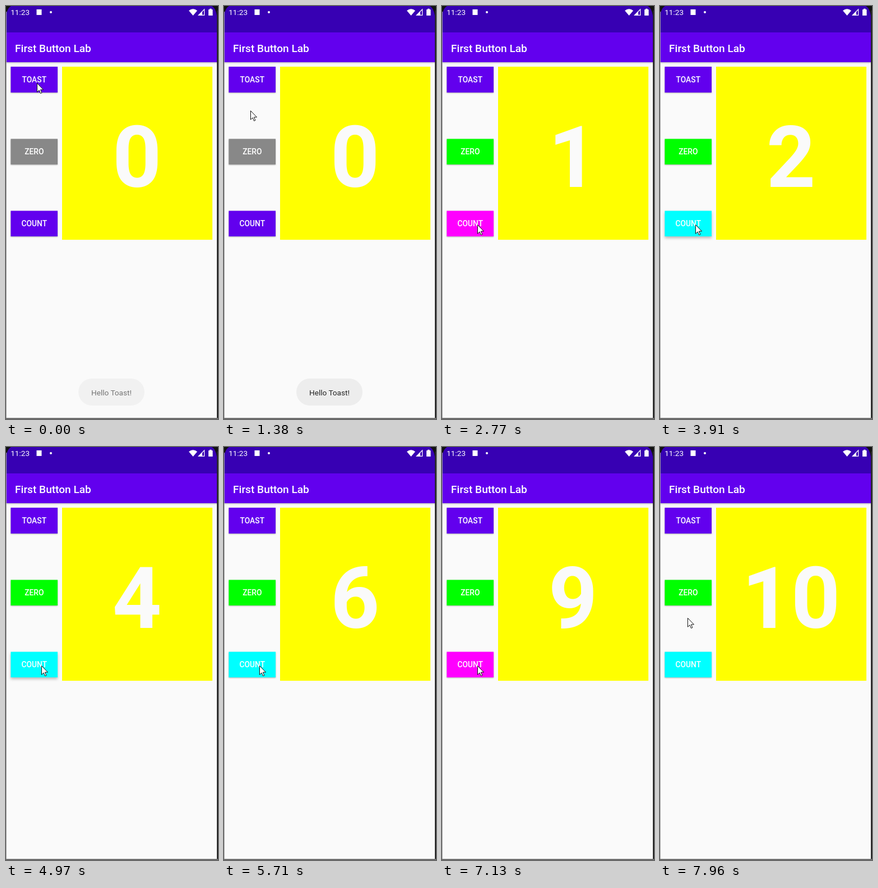
Write an HTML page that moves like this. It is 378 px wide and 735 px high and loops after 8000 ms.

```html
<!DOCTYPE html>
<html lang="en">
<head>
<meta charset="utf-8">
<title>Button counter</title>
<style>
html, body { margin: 0; width: 100%; height: 100%; overflow: hidden; background: #fafafa; }
svg { display: block; width: 378px; height: 735px; }
text { font: 500 13.8px Roboto, sans-serif; fill: #fff; }
.mid { text-anchor: middle; }
.regular { font-size: 13.6px; font-weight: 400; }
.title { font-size: 19.1px; }
#digits { font-size: 152.8px; font-weight: 700; fill: #fafafa; }
.button { filter: drop-shadow(0 1px 1px rgba(0, 0, 0, .3)); }
.button.pressed { filter: drop-shadow(0 3px 2.5px rgba(0, 0, 0, .26)); }
.bar { filter: drop-shadow(0 1px 1.5px rgba(0, 0, 0, .3)); }
</style>
</head>
<body>
<svg viewBox="0 0 378 735">
  <rect width="378" height="735" fill="#fafafa"/>

  <rect class="bar" y="40" width="378" height="60" fill="#6200ee"/>
  <rect width="378" height="47" fill="#3700b3"/>
  <text class="title" x="16" y="81.5">First Button Lab</text>

  <text class="regular" x="8.2" y="16">11:23</text>
  <g fill="#fff">
    <rect x="54.5" y="6" width="9" height="10"/>
    <circle cx="80" cy="11" r="2"/>
    <path d="M326 8.2Q333.5 2.4 341 8.2L333.5 17Z"/>
    <path d="M342.5 16.8L350 9.2V16.8Z"/>
    <path d="M343.4 16.4L353.6 6V16.4Z" fill="none" stroke="#fff" stroke-width="1.2"/>
    <path d="M361 6.2H363V4.7H366.5V6.2H368.5V17H361Z"/>
  </g>

  <rect x="100" y="108" width="268" height="308" fill="#ff0"/>
  <text id="digits" class="mid" x="233.7" y="321.6">0</text>

  <g id="toastButton" class="button"><rect x="8.5" y="108" width="83.5" height="46" fill="#6200ee"/></g>
  <g id="zeroButton" class="button"><rect x="8.5" y="236.5" width="83.5" height="45.5"/></g>
  <g id="countButton" class="button"><rect x="8.5" y="364.5" width="83.5" height="45.5"/></g>
  <text class="mid" x="50.3" y="136">TOAST</text>
  <text class="mid" x="50.3" y="264.2">ZERO</text>
  <text class="mid" x="50.3" y="392.3">COUNT</text>

  <g id="toast">
    <rect x="129" y="663" width="118" height="48" rx="24" fill="#ededed"/>
    <text class="mid regular" x="188" y="692.5" style="fill:#222">Hello Toast!</text>
  </g>

  <path d="M0 0H9Q2 4 0 17ZM378 0H367Q374 4 376 17H378Z" fill="#111"/>
  <path d="M.5 10V735" stroke="#a0a0a0"/>
  <path d="M377 8V735" stroke="#222" stroke-width="2"/>
  <path d="M0 734H378" stroke="#707070" stroke-width="2"/>

  <path id="cursor" d="M.5 .5V16.2L4.1 12.8L6.5 18.5L8.9 17.5L6.5 11.9H11.5Z" fill="#fff" stroke="#111"/>
</svg>
<script>
const LOOP = 8000;
const FIRST_TAP = 2630, SECOND_TAP = 3450, PRESS = 130;
const $ = id => document.getElementById(id);
const clamp = v => Math.max(0, Math.min(1, v));
const paint = (id, color) => $(id).firstElementChild.setAttribute("fill", color);

// After the first tap the others follow at a slowly quickening pace.
const taps = [FIRST_TAP];
for (let k = 0; k < 9; k++) taps.push(SECOND_TAP + 570 * k - 7.5 * k * k);

// The pointer slides down a shallow arc, slowing towards COUNT, in 135 ms steps.
function pointer(t) {
  if (t >= 7960) return [49, 304];
  const step = Math.floor((t - 1380) / 135);
  const p = step < 0 ? 0 : Math.sin(clamp((step + .75) / 6) * Math.PI / 2);
  return [55 - 51 * p + 59 * p * p, 137 + 252 * p].map(Math.round);
}

function draw(now) {
  const t = now % LOOP;
  const count = taps.filter(tap => tap <= t).length;
  const pressed = taps.some(tap => t >= tap - PRESS && t < tap);

  $("digits").textContent = count;
  paint("zeroButton", count ? "#0f0" : "#888");
  paint("countButton", !count ? "#6200ee" : count % 2 ? "#f0f" : "#0ff");
  $("countButton").classList.toggle("pressed", pressed);
  $("toast").setAttribute("opacity", clamp(Math.min(.62 + t / 700, (2220 - t) / 540)));
  $("cursor").setAttribute("transform", `translate(${pointer(t)})`);
}

const start = performance.now();
function tick() {
  draw(performance.now() - start);
  requestAnimationFrame(tick);
}
tick();
</script>
</body>
</html>
```
